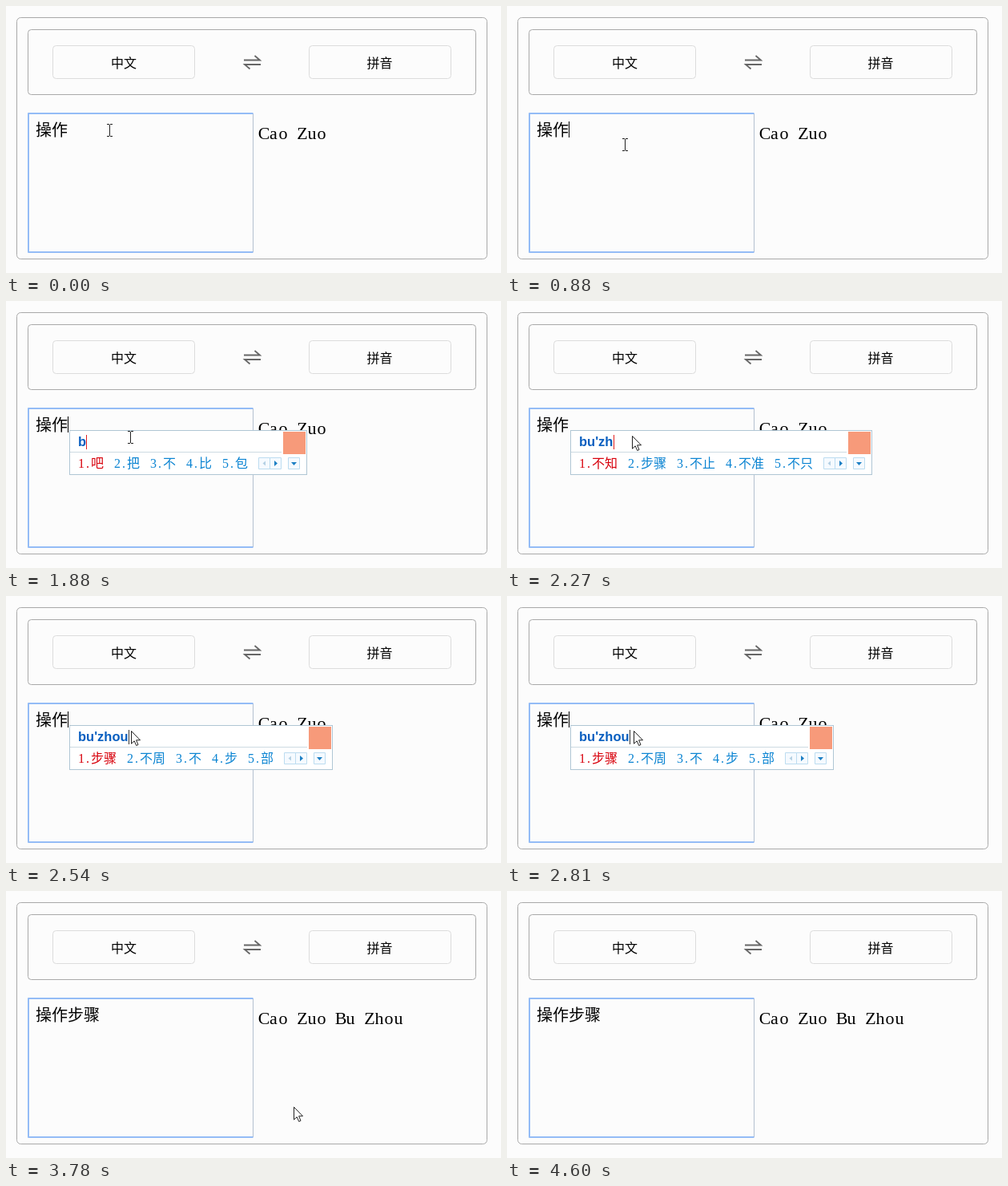
Write an HTML page that moves like this. It is 618x333 px and loops after 4.7 s.

```html
<!DOCTYPE html>
<html lang="zh-CN">
<head>
<meta charset="utf-8">
<title>中文转拼音</title>
<style>
  html, body { margin: 0; width: 618px; height: 333px; overflow: hidden; background: #fcfcfc; }
  svg { display: block; }
  text { white-space: pre; }
  .cjk { font-family: "Noto Sans CJK SC", "Noto Sans CJK", sans-serif; }
  .typed { font-size: 20px; font-weight: 300; }
  .label { font-size: 16px; text-anchor: middle; }
  .cell { font-family: "Liberation Serif", serif; text-anchor: middle; }
  .reading { font: bold 16.5px "Liberation Sans", sans-serif; fill: #0a5fc0; }
  .candidate { font-size: 16px; font-weight: 300; }
  .frame { fill: none; stroke: #a9a9a9; }
  .button { fill: none; stroke: #dcdcdc; }
  .key { fill: #f5faff; stroke: #bcdcf0; }
</style>
</head>
<body>
<svg width="618" height="333" viewBox="0 0 618 333">
  <rect width="618" height="333" fill="#fcfcfc"/>
  <rect class="frame" x="13.5" y="14.5" width="587" height="301" rx="5"/>
  <rect class="frame" x="27.5" y="29.5" width="559" height="81" rx="4"/>
  <rect class="button" x="58.5" y="49.5" width="177" height="41" rx="4"/>
  <rect class="button" x="378.5" y="49.5" width="177" height="41" rx="4"/>
  <text class="cjk label" x="147" y="76.5">中文</text>
  <text class="cjk label" x="466.5" y="76.5">拼音</text>
  <path d="M297 67.5H317L310.5 62M318 73H298L304.500 78.500" fill="none" stroke="#666" stroke-width="1.8"/>

  <path d="M308.500 134V307" stroke="#b4c0d0"/>
  <path d="M308.500 134H28V307H308.500" fill="none" stroke="#94bcf6" stroke-width="2" stroke-linejoin="round"/>
  <text id="typed" class="cjk typed" x="37" y="161.500"></text>
  <rect id="caret" y="144" width="1" height="20"/>
  <g id="pinyin"></g>

  <g id="ime">
    <rect id="panel" x="79.500" y="161.500" height="55" fill="#fff" stroke="#b0c6d4"/>
    <path id="divider" stroke="#cddae2"/>
    <text id="reading" class="reading" x="90" y="181"></text>
    <rect id="readingCaret" y="167" width="1" height="18"/>
    <g id="candidates"></g>
    <g id="controls">
      <rect x="-30" y="163" width="28" height="28" fill="#f79a7a"/>
      <path class="key" d="M-60.500 195.500h14v14h-14zM-46.500 195.500h14v14h-14zM-23.500 195.500h14v14h-14z"/>
      <path d="M-52 199.500v6l-3.500-3z" fill="#b4d0e4"/>
      <path d="M-41 199v7l4-3.500zM-20 201h7l-3.500 4z" fill="#1c7fc4"/>
    </g>
  </g>

  <g id="beam" fill="none" stroke="#222">
    <path d="M-3 -7.500H0M1 -7.500H4M.500 -7V7M-3 7.500H0M1 7.500H4"/>
  </g>
  <g id="arrow">
    <path d="M.500 .500V16.200L4.200 12.800L6.700 18.500L9 17.500L6.600 11.800H11.500Z" fill="#fff" stroke="#222"/>
  </g>
</svg>
<script>
const LOOP = 4700;
const el = Object.fromEntries([...document.querySelectorAll('[id]')].map(n => [n.id, n]));

// Each track lists [start time, ...values]; a value holds until the next entry.
const pointer = [
  [0, 'beam', 129, 155], [280, 'beam', 178, 149], [430, 'beam', 182, 146],
  [580, 'beam', 184, 159], [730, 'beam', 147, 171], [880, 'beam', 147, 173],
  [1030, 'beam', 150, 172], [1150, 'beam', 152, 170], [1300, 'beam', 153, 170],
  [1450, 'beam', 155, 170], [2030, 'arrow', 156, 168], [2690, 'arrow', 157, 168],
  [2810, 'arrow', 158, 168], [2960, 'beam', 158, 168], [3630, 'beam', 167, 167],
  [3780, 'arrow', 359, 269], [3900, 'arrow', 499, 316], [4050, 'arrow', 518, 330],
  [4200, 'none', 0, 0]
];
const caretBlink = [
  [0, false], [430, true], [1030, false], [1450, true], [2030, false],
  [2540, true], [3510, false], [4050, true], [4600, false]
];
const typedText = [[0, '操作'], [2960, '操作步骤']];
const pinyinText = [[0, 'Cao Zuo'], [3080, 'Cao Zuo Bu Zhou']];
const composition = [
  [0, '', ''],
  [1880, 'b', '吧 把 不 比 包'],
  [2030, 'bu', '不 部 步 布 补'],
  [2150, "bu'z", '不在 不做 不足 步骤 不再'],
  [2270, "bu'zh", '不知 步骤 不止 不准 不只'],
  [2420, "bu'zho", '步骤 不中 不周 不重 部中'],
  [2540, "bu'zhou", '步骤 不周 不 步 部'],
  [2960, '', '']
];

const at = (track, t) => track.findLast(entry => entry[0] <= t).slice(1);
const show = (node, on) => node.setAttribute('display', on ? 'inline' : 'none');
const move = (node, x, y) => node.setAttribute('transform', `translate(${x} ${y})`);

// Half-width letters, each centred in a fixed cell.
const cells = (str, x, y, pitch, size, fill) => [...str].map((c, i) =>
  `<text class="cell" x="${x + (i + 0.5) * pitch}" y="${y}" font-size="${size}" fill="${fill}">${c}</text>`
).join('');

function drawCandidates(words) {
  let x = 90;
  el.candidates.innerHTML = words.map((word, i) => {
    const fill = i ? '#0b84d2' : '#d8000c';
    const left = x;
    x += 16 + word.length * 16 + 13;
    return cells(`${i + 1}.`, left, 208, 8, 16, fill) +
      `<text class="cjk candidate" x="${left + 16}" y="208" fill="${fill}">${word}</text>`;
  }).join('');
  return x - 13;
}

function drawIme(reading, words) {
  show(el.ime, reading);
  if (!reading) return;
  const right = drawCandidates(words.split(' ')) + 74;
  el.panel.setAttribute('width', right - 80);
  el.divider.setAttribute('d', `M80 188.5H${right - 32}`);
  move(el.controls, right, 0);
  el.reading.textContent = reading;
  el.readingCaret.setAttribute('x', Math.round(90.4 + el.reading.getComputedTextLength()));
  el.readingCaret.setAttribute('fill', reading === "bu'zhou" ? '#333' : '#e02020');
}

let lastState = '';
function render(t) {
  const [kind, x, y] = at(pointer, t);
  const [caretOn] = at(caretBlink, t);
  const [typed] = at(typedText, t);
  const [pinyin] = at(pinyinText, t);
  const [reading, words] = at(composition, t);
  const state = [kind, x, y, caretOn, typed, pinyin, reading].join();
  if (state === lastState) return;
  lastState = state;

  el.typed.textContent = typed;
  el.caret.setAttribute('x', 37 + typed.length * 20);
  show(el.caret, caretOn);
  el.pinyin.innerHTML = cells(pinyin, 316, 165.5, 12, 22, '#000');
  drawIme(reading, words);
  for (const name of ['beam', 'arrow']) {
    show(el[name], kind === name);
    move(el[name], x, y);
  }
}

const start = performance.now();
function tick() {
  render((performance.now() - start) % LOOP);
  requestAnimationFrame(tick);
}
tick();
</script>
</body>
</html>
```
